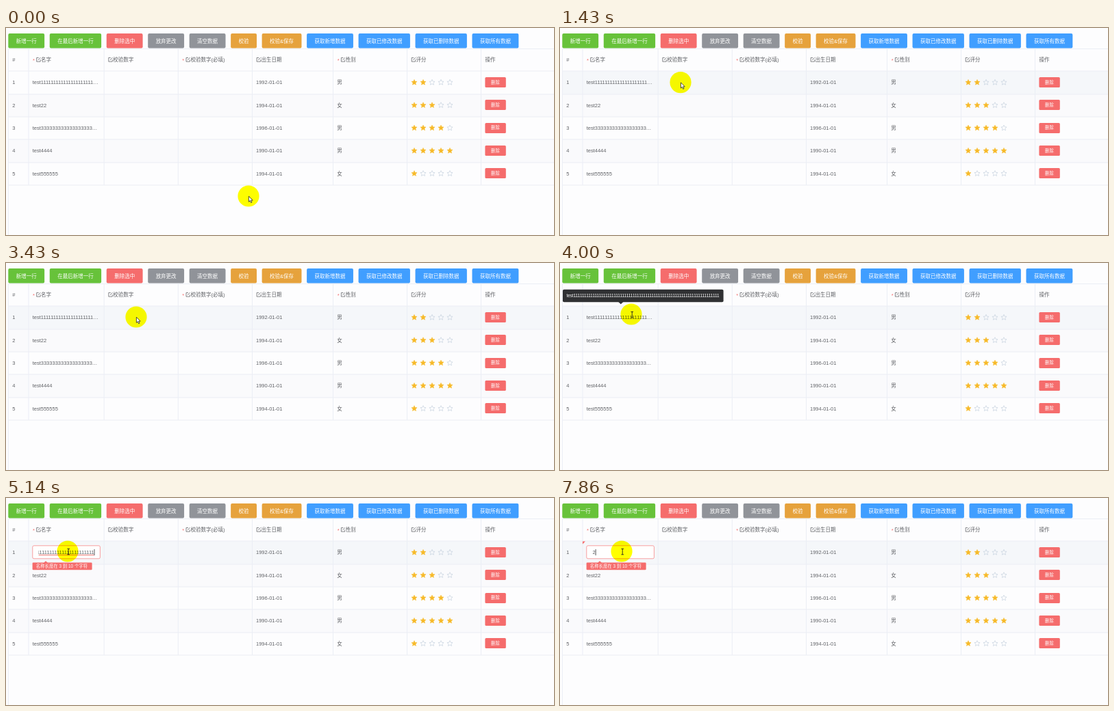
Write an HTML page that moves like this. It is 800 by 303 pixels and loops after 8 s.

```html
<!DOCTYPE html>
<html lang="zh-CN">
<head>
<meta charset="utf-8">
<title>可编辑表格</title>
<style>
  html, body { margin: 0; width: 100%; height: 100%; overflow: hidden; background: #fdfdfe; }
  svg { display: block; width: 100%; height: 100%; }
  text {
    font: 7.5px "Liberation Sans", "Noto Sans CJK SC", "Noto Sans CJK", sans-serif;
    fill: #606266; white-space: pre;
  }
  .small { font-size: 6.4px; }
  .white { fill: #fff; font-weight: 500; }
  .red { fill: #f56c6c; }
  .mid { text-anchor: middle; }
  .end { text-anchor: end; }
  #halo { mix-blend-mode: multiply; }
</style>
</head>
<body>
<svg id="stage" viewBox="0 0 800 303" xmlns="http://www.w3.org/2000/svg"></svg>
<script>
const LOOP = 8000, FPS = 7;
const GREEN = '#67c23a', RED = '#f56c6c', GREY = '#909399', ORANGE = '#e6a23c', BLUE = '#409eff';
const PAGE = '#fdfdfe', LINE = '#ebeef5', DARK = '#303133';
const stage = document.getElementById('stage');

function add(parent, tag, attrs = {}, content) {
  const el = document.createElementNS('http://www.w3.org/2000/svg', tag);
  for (const key in attrs) el.setAttribute(key, attrs[key]);
  if (content !== undefined) el.textContent = content;
  parent.appendChild(el);
  return el;
}
const box = (parent, x, y, width, height, fill, more) =>
  add(parent, 'rect', { x, y, width, height, fill, ...more });
const label = (parent, x, y, content, cls = '') =>
  add(parent, 'text', { x, y, class: cls }, content);
const path = (parent, d, attrs) => add(parent, 'path', { d, ...attrs });
const show = (el, on) => el.setAttribute('visibility', on ? 'inherit' : 'hidden');
const fade = (el, value) => el.setAttribute('opacity', value);

const rowTop = i => Math.round(63.3 + i * 33.33);
const rowBase = i => 82.3 + i * 33.33;

box(stage, 0, 0, 800, 303, PAGE);

// Toolbar
const buttons = [
  ['新增一行', GREEN], ['在最后新增一行', GREEN], ['删除选中', RED], ['放弃更改', GREY],
  ['清空数据', GREY], ['校验', ORANGE], ['校验&保存', ORANGE], ['获取新增数据', BLUE],
  ['获取已修改数据', BLUE], ['获取已删除数据', BLUE], ['获取所有数据', BLUE]
];
let left = 3.3;
for (const [name, color] of buttons) {
  const ems = [...name].reduce((sum, c) => sum + (c === '&' ? 0.667 : 1), 0);
  const width = ems * 7.5 + 22.85;
  box(stage, left, 8.1, width, 21.4, color, { rx: 2 });
  label(stage, left + width / 2, 21.6, name, 'white mid');
  left += width + 7.62;
}

// Table grid
const rows = [
  ['test' + '1'.repeat(21) + '…', '1992-01-01', '男', 2],
  ['test22', '1994-01-01', '女', 3],
  ['test' + '3'.repeat(18) + '…', '1996-01-01', '男', 4],
  ['test4444', '1990-01-01', '男', 5],
  ['test555555', '1994-01-01', '女', 1]
];
const stripe = i => i % 2 ? '#fafafc' : PAGE;
const rowRects = rows.map((_, i) =>
  box(stage, 4, rowTop(i), 796, rowTop(i + 1) - rowTop(i), stripe(i)));
for (let i = -1; i <= 5; i++) box(stage, 3, i < 0 ? 30 : rowTop(i) - 0.5, 797, 1, LINE);
box(stage, 3, 30, 1, 273, LINE);
for (const x of [32.5, 142.7, 250.8, 359, 477, 585, 693]) box(stage, x, 30, 1, 200, LINE);

// Header
function editIcon(x) {
  path(stage, `M${x + 3.6} 43.5H${x + 0.6}V49.2H${x + 6}V46.3M${x + 2.6} 47.2L${x + 6.2} 43.2`,
    { fill: 'none', stroke: '#606266', 'stroke-width': 0.75 });
}
function header(x, name, required) {
  if (required) {
    label(stage, x, 49.5, '*', 'red');
    x += 5.1;
  }
  editIcon(x);
  label(stage, x + 7, 49, name);
}
label(stage, 9.2, 49, '#');
header(39, '名字', true);
header(149.2, '校验数字');
header(257.3, '校验数字(必填)', true);
header(365.5, '出生日期');
header(483.7, '性别', true);
header(591.6, '评分');
label(stage, 699.4, 49, '操作');

// Body
function star(cx, cy, on) {
  const points = Array.from({ length: 10 }, (_, i) => {
    const r = i % 2 ? 2 : 4.3;
    const a = (i / 5 - 0.5) * Math.PI;
    return (cx + r * Math.cos(a)).toFixed(2) + ',' + (cy + r * Math.sin(a)).toFixed(2);
  }).join(' ');
  add(stage, 'polygon', {
    points, fill: on ? '#f7ba2a' : 'none', stroke: on ? '#f7ba2a' : '#c6d1de',
    'stroke-width': on ? 0.5 : 0.7, 'stroke-linejoin': 'round'
  });
}
const names = rows.map(([name, date, sex, score], i) => {
  const y = rowBase(i);
  label(stage, 9.2, y, i + 1);
  label(stage, 365, y, date);
  label(stage, 483.2, y, sex);
  for (let s = 0; s < 5; s++) star(596 + s * 13, y - 2.6, s < score);
  box(stage, 699.4, Math.round(y - 10.3), 30.4, 15, RED, { rx: 1.6 });
  label(stage, 714.5, y - 0.6, '删除', 'small white mid');
  return label(stage, 38.7, y, name);
});

// Cell editor
const editor = add(stage, 'g');
const dirty = path(editor, 'M33 63.5h4l-4 4z', { fill: RED });
box(editor, 38.8, 69.8, 98.6, 19, '#fff', { rx: 2, stroke: RED, 'stroke-width': 0.65 });
const clip = add(add(stage, 'defs'), 'clipPath', { id: 'field' });
box(clip, 47.4, 71, 82.2, 17, '#000');
const field = add(editor, 'g', { 'clip-path': 'url(#field)' });
const selection = box(field, 47.4, 74.3, 81.4, 10.4, '#3297fd');
const longText = label(field, 128.7, 82.3, '1'.repeat(30), 'end');
const squiggle = box(field, 47.4, 83.2, 81.3, 0.7, '#e8443c');
const shortText = label(field, 47.4, 82.3, '2');
const caret = box(editor, 0, 75, 0.8, 9, '#303133');

function errorTip(message, width) {
  const g = add(stage, 'g');
  path(g, 'M55 95l3-2.7 3 2.7z', { fill: RED });
  box(g, 38.6, 94.6, width, 10.6, RED, { rx: 1.2 });
  label(g, 43.8, 102.3, message, 'small white');
  return g;
}
const lengthError = errorTip('名称长度在 3 到 10 个字符', 87);
const emptyError = errorTip('请输入名称', 43);

// Overflow tooltip
const tooltip = add(stage, 'g');
box(tooltip, 4, 38.7, 234.6, 18.5, DARK, { rx: 2 });
path(tooltip, 'M85.3 57h7l-3.5 3.3z', { fill: DARK });
label(tooltip, 9.4, 50.4, 'test' + '1'.repeat(69), 'small white');

// Pointer
const halo = add(stage, 'circle', { id: 'halo', r: 15.6, fill: '#ffff00' });
const arrow = path(stage, 'M0 0V8.2L1.9 6.5L3.2 9.5L4.6 8.9L3.3 6H5.8Z',
  { fill: '#fff', stroke: '#222', 'stroke-width': 0.8, 'stroke-linejoin': 'round' });
const beam = path(stage, 'M-1.8 -4.2H1.8M0 -4.2V4.2M-1.8 4.2H1.8',
  { fill: 'none', stroke: '#222', 'stroke-width': 0.9 });

// Keys are [step, ...values], linear in between
function track(keys, step) {
  const next = keys.findIndex(key => key[0] > step);
  if (next === 0) return keys[0].slice(1);
  if (next < 0) return keys[keys.length - 1].slice(1);
  const a = keys[next - 1], b = keys[next];
  const p = (step - a[0]) / (b[0] - a[0]);
  return a.slice(1).map((v, i) => v + (b[i + 1] - v) * p);
}
const pointerKeys = [
  [3, 354, 246], [4, 348, 240], [7, 262, 160], [9, 194, 97], [10, 176, 79.6],
  [11, 146, 80], [12, 128, 81], [14, 123, 81], [21, 123, 81], [23, 178, 80],
  [24, 190, 79], [25, 172, 78], [27, 113, 76], [28, 104, 75], [31, 90, 78]
];
const tooltipKeys = [[12, 0], [14, 1], [21, 1], [23, 0], [26, 0], [28, 1], [31, 1], [33, 0]];
const errorKeys = [[32, 0], [35, 1]];
const EDIT = 32, BLINK = 37, SELECT = 41, CLEAR = 47, BLINK_EMPTY = 50, TYPE = 54;

function draw(time) {
  const step = Math.floor((time % LOOP + 5) * FPS / 1000);
  const [x, y] = track(pointerKeys, step);
  const inText = x < 136;
  halo.setAttribute('cx', x);
  halo.setAttribute('cy', y);
  arrow.setAttribute('transform', `translate(${x + 0.4} ${y + 0.2})`);
  beam.setAttribute('transform', `translate(${x + 1.2} ${y + 0.6})`);
  show(arrow, !inText);
  show(beam, inText);

  rowRects.forEach((rect, i) => {
    const hover = y >= rowTop(i) && y < rowTop(i + 1);
    rect.setAttribute('fill', hover ? '#f5f7fa' : stripe(i));
  });
  fade(tooltip, track(tooltipKeys, step)[0]);

  const editing = step >= EDIT, cleared = step >= CLEAR, typed = step >= TYPE;
  const selected = step >= SELECT && !cleared;
  show(names[0], !editing);
  show(editor, editing);
  show(dirty, editing && cleared);
  show(selection, editing && selected);
  show(longText, editing && !cleared);
  show(squiggle, editing && !cleared);
  longText.style.fill = selected ? '#fff' : '';
  show(shortText, typed);
  const caretOn = step < BLINK || (cleared && step < BLINK_EMPTY) || typed;
  show(caret, editing && caretOn);
  caret.setAttribute('x', typed ? 51.7 : cleared ? 47.4 : 128.6);
  fade(lengthError, track(errorKeys, step)[0]);
  show(lengthError, editing && (!cleared || typed));
  show(emptyError, cleared && !typed);
}

const start = performance.now();
function tick() {
  draw(performance.now() - start);
  requestAnimationFrame(tick);
}
tick();
</script>
</body>
</html>
```
